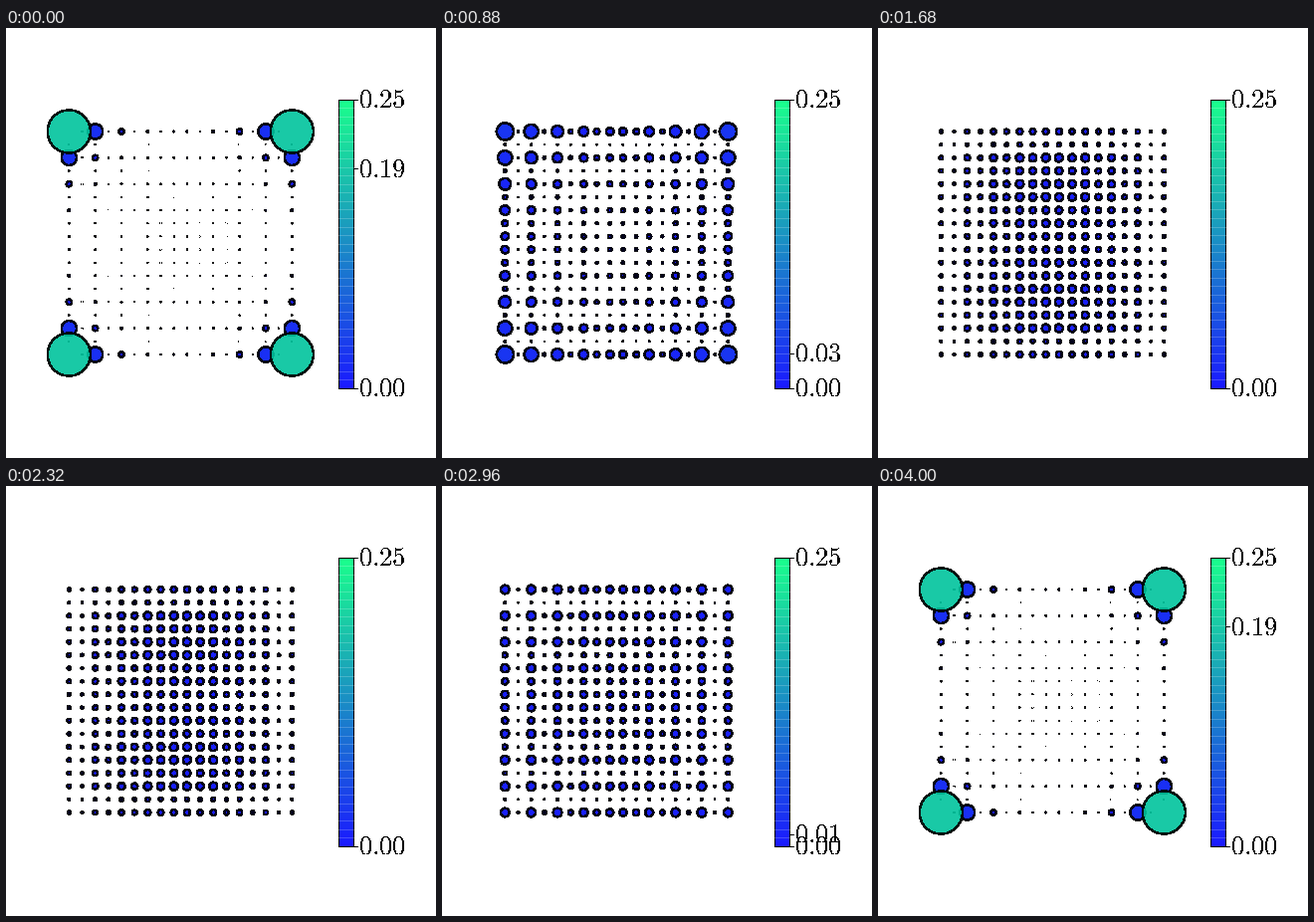
Animation, 432 px wide and 432 px high, one loop 4080 ms. Source, as a matplotlib script:

```python
import numpy as np
import matplotlib.pyplot as plt
from matplotlib.animation import FuncAnimation
from matplotlib.patches import Rectangle

plt.rcParams["mathtext.fontset"] = "cm"

SIZE, FRAMES, STEP = 432, 51, 80
N = 18                       # sites along each side
VMAX = 0.25                  # top of the colour scale
AREA = 9700                  # marker area per unit density
ALPHA = 0.9
BAR_L, BAR_R, BAR_T, BAR_B = 334, 349, 71.6, 361.6


def chain_modes(a, b):
    """Densities of the two modes nearest zero energy in a dimerised chain."""
    hop = np.where(np.arange(N - 1) % 2 == 0, a, b)
    _, vec = np.linalg.eigh(np.diag(hop, 1) + np.diag(hop, -1))
    return vec[:, N // 2 - 1] ** 2, vec[:, N // 2 - 2] ** 2


def density(i):
    delta = 0.48 * np.cos(2 * np.pi * i / (FRAMES - 1))
    first, second = chain_modes(1 - delta, 1 + delta)
    # past the transition the second vertical mode joins in
    rows = (first + second) / 2 if delta < -0.06 else first
    return np.outer(rows, first)


def bar_y(v):
    return BAR_B - (BAR_B - BAR_T) * v / VMAX


fig = plt.figure(figsize=(SIZE / 72, SIZE / 72), dpi=72, facecolor="white")
ax = fig.add_axes([0, 0, 1, 1])
ax.axis("off")

# colour bar with its faint seams
ax.imshow(np.linspace(0, 1, 256)[:, None], cmap="winter", origin="lower",
          extent=(BAR_L, BAR_R, BAR_B, BAR_T), aspect="auto", alpha=ALPHA)
ax.hlines(np.linspace(BAR_B, BAR_T, 35)[1:-1], BAR_L, BAR_R, colors="white",
          alpha=0.2, lw=1, antialiased=False)
ax.add_patch(Rectangle((BAR_L, BAR_T), BAR_R - BAR_L, BAR_B - BAR_T,
                       fill=False, ec="black", lw=1, antialiased=False))
ax.set_xlim(0, SIZE)
ax.set_ylim(SIZE, 0)


def add_tick(v):
    y = bar_y(v)
    line, = ax.plot([BAR_R + 1, BAR_R + 4], [y, y], color="black", lw=1,
                    antialiased=False)
    text = ax.text(354.5, y + 1, f"${v:.2f}$", size=26.6, va="center",
                   antialiased=False)
    return line, text


add_tick(0)
add_tick(VMAX)
mid_line, mid_text = add_tick(0)

# lattice sites
gx, gy = np.meshgrid(np.linspace(63.3, 287.3, N), np.linspace(328, 104, N))
sites = np.column_stack([gx.ravel(), gy.ravel()])
dots = ax.scatter(*sites.T, s=np.ones(N * N), c=np.zeros(N * N),
                  cmap="winter", vmin=0, vmax=VMAX, edgecolors="black",
                  linewidths=1.4, alpha=ALPHA, antialiased=False, zorder=3)


def update(i):
    p = density(i).ravel()
    order = np.argsort(p, kind="stable")     # largest on top
    dots.set_offsets(sites[order])
    dots.set_sizes(AREA * p[order])
    dots.set_array(p[order])
    v = round(float(p[0]), 2)
    y = bar_y(v)
    mid_line.set_ydata([y, y])
    mid_text.set_y(y + 1)
    mid_text.set_text(f"${v:.2f}$")
    return dots, mid_line, mid_text


anim = FuncAnimation(fig, update, frames=FRAMES, interval=STEP,
                     repeat=True, repeat_delay=0, blit=False)
plt.show()
```
